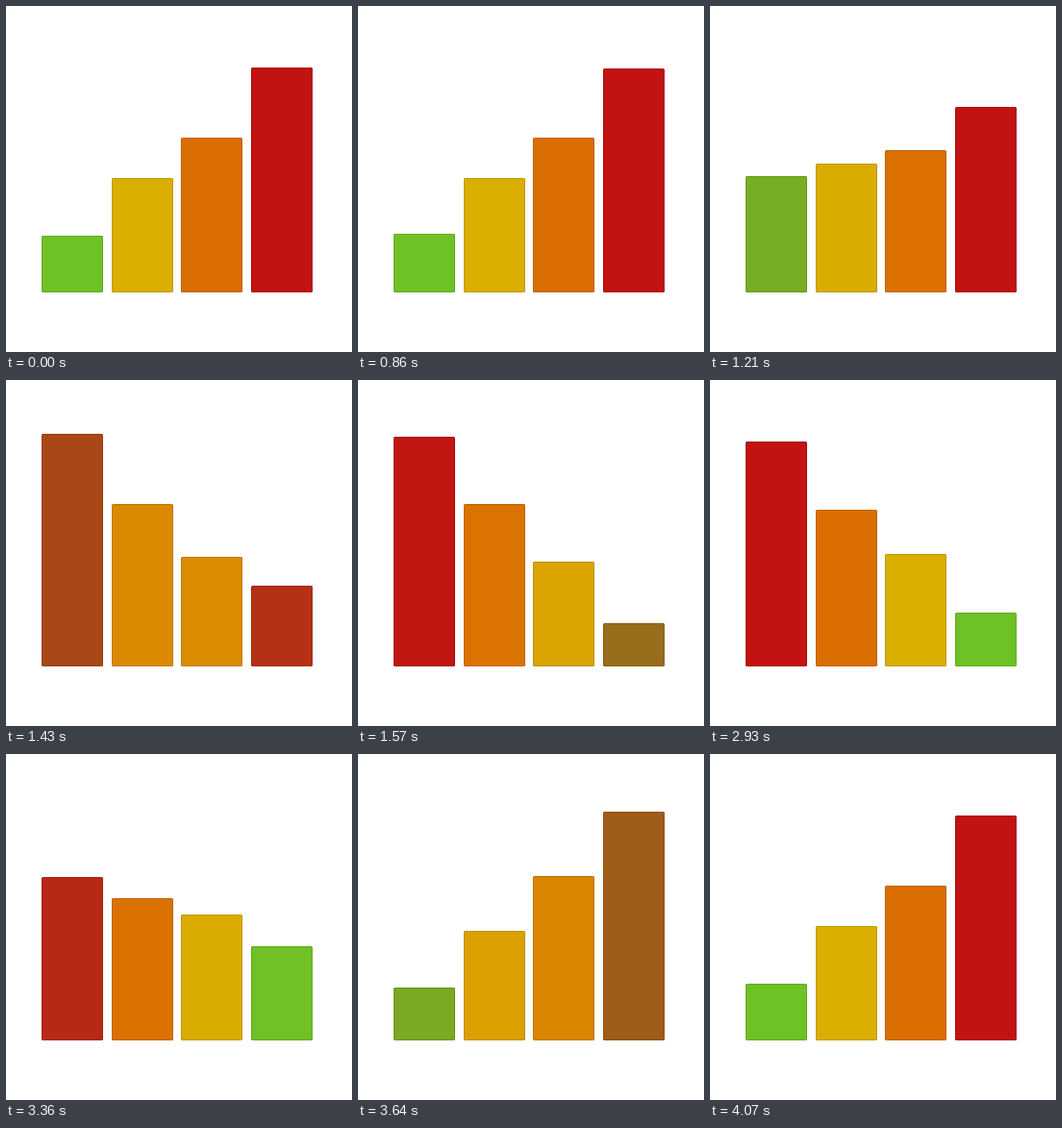
Recreate the animation shown at these times as an HTML page with a canvas. Size 360x360 px, loop 4.87 s.

```html
<!DOCTYPE html>
<html lang="en">
<head>
<meta charset="utf-8">
<title>Bars</title>
<style>
  html, body { margin: 0; width: 100%; height: 100%; overflow: hidden; background: #fff; }
  canvas { display: block; width: 360px; height: 360px; }
</style>
</head>
<body>
<canvas id="stage" width="360" height="360"></canvas>
<script>
const ctx = document.getElementById('stage').getContext('2d');
const LOOP = 4870;
const STEPS_PER_MS = 0.014;
const BASE = 298;
const WIDTH = 64;

const GREEN = [111, 194, 38];
const YELLOW = [219, 175, 0];
const ORANGE = [219, 110, 0];
const RED = [195, 18, 18];

// a/b: resting tops; peakB/peakA: overshoot tops; rise: [start, end] of the move;
// tintB/tintA: [start, length] of the colour change.
const bars = [
  { x: 37, a: 239, b: 64, peakB: 56, peakA: 243, colorA: GREEN, colorB: RED,
    rise: [0, 640], tintB: [320, 502], tintA: [320, 502] },
  { x: 110, a: 179, b: 135, peakB: 127, peakA: 184, colorA: YELLOW, colorB: ORANGE,
    rise: [12, 675], tintB: [352, 515], tintA: [352, 515] },
  { x: 182, a: 137, b: 181, peakB: 190, peakA: 127, colorA: ORANGE, colorB: YELLOW,
    rise: [24, 705], tintB: [361, 572], tintA: [361, 572] },
  { x: 255, a: 64, b: 242, peakB: 254, peakA: 57, colorA: RED, colorB: GREEN,
    rise: [36, 733], tintB: [480, 590], tintA: [401, 548] }
];

const SETTLE = 330;
const toB = { start: 790, stretch: 1 };
const toA = { start: 2900, stretch: 1.055 };

const clamp = v => Math.min(1, Math.max(0, v));
const lerp = (a, b, p) => a + (b - a) * p;
const smooth = v => { const p = clamp(v); return p * p * (3 - 2 * p); };
const bezier = (p1, p2, s) =>
  3 * p1 * s * (1 - s) ** 2 + 3 * p2 * s * s * (1 - s) + s ** 3;

function lateEase(x) {
  if (x <= 0 || x >= 1) return clamp(x);
  let low = 0, high = 1;
  for (let i = 0; i < 24; i++) {
    const mid = (low + high) / 2;
    if (bezier(0.9, 0.8, mid) < x) low = mid; else high = mid;
  }
  return bezier(0.04, 1, low);
}

function topAt(time, [start, end], from, peak, to) {
  return time < end
    ? lerp(from, peak, lateEase((time - start) / (end - start)))
    : lerp(peak, to, smooth((time - end) / SETTLE));
}

function drawBar(x, top, color) {
  const y = Math.round(top);
  ctx.beginPath();
  ctx.roundRect(x, y, WIDTH, BASE - y, 1.5);
  ctx.fillStyle = `rgb(${color.map(Math.round).join(',')})`;
  ctx.fill();
  ctx.beginPath();
  ctx.roundRect(x + 0.5, y + 0.5, WIDTH - 1, BASE - y - 1, 1);
  ctx.strokeStyle = 'rgba(0,0,0,0.13)';
  ctx.lineWidth = 1;
  ctx.stroke();
}

function render(ms) {
  const t = Math.floor((ms + 5) * STEPS_PER_MS) / STEPS_PER_MS;
  const back = t >= toA.start;
  const phase = back ? toA : toB;
  const time = (t - phase.start) / phase.stretch;

  ctx.fillStyle = '#fff';
  ctx.fillRect(0, 0, 360, 360);
  for (const bar of bars) {
    const [from, peak, to] = back ? [bar.b, bar.peakA, bar.a] : [bar.a, bar.peakB, bar.b];
    const [c0, c1] = back ? [bar.colorB, bar.colorA] : [bar.colorA, bar.colorB];
    const [tintStart, tintLength] = back ? bar.tintA : bar.tintB;
    const tint = smooth((time - tintStart) / tintLength);
    drawBar(bar.x, topAt(time, bar.rise, from, peak, to), c0.map((c, i) => lerp(c, c1[i], tint)));
  }
}

const began = performance.now();
function tick() {
  render((performance.now() - began) % LOOP);
  requestAnimationFrame(tick);
}
tick();
</script>
</body>
</html>
```
